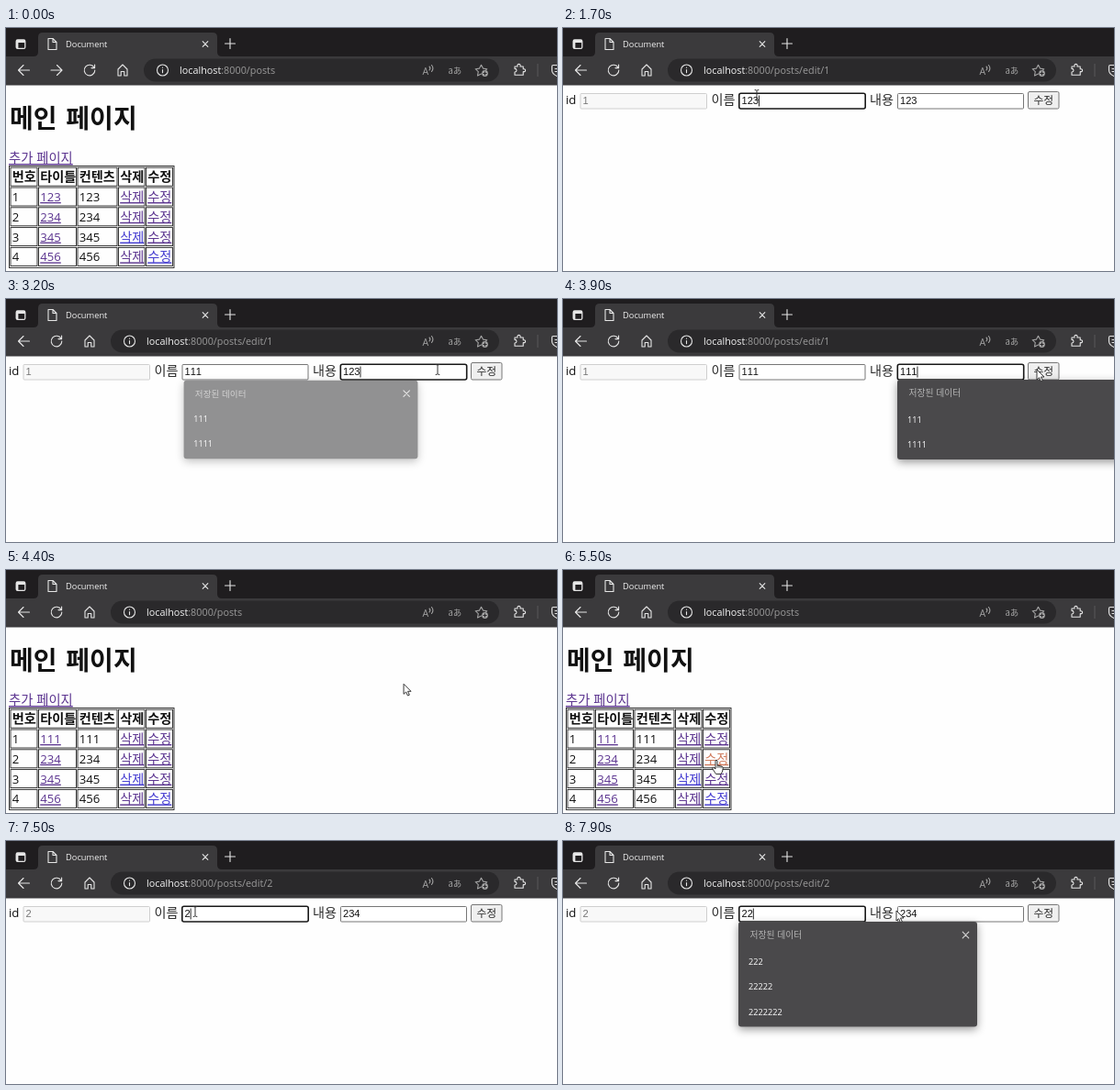
An HTML page that plays this animation: 600x265 px, repeating every 8 s.

```html
<!DOCTYPE html>
<html lang="ko">
<head>
<meta charset="utf-8">
<style>
html, body { margin: 0; width: 600px; height: 265px; overflow: hidden; background: #fefefe; }
svg { display: block; }
text { font-family: 'Open Sans', 'Noto Sans', sans-serif; white-space: pre; }
.ko { font-family: 'Noto Sans CJK KR', 'Noto Sans CJK', sans-serif; font-weight: 300; }
.bold { font-weight: 700; }
.title { word-spacing: 2px; }
.field { font-family: 'Liberation Sans', Arial, sans-serif; font-kerning: none; }
.link { text-decoration: underline; }
.icon path { fill: none; stroke: currentColor; stroke-width: 1.1; stroke-linecap: round; stroke-linejoin: round; }
.popup { filter: drop-shadow(0 3px 5px rgba(0, 0, 0, .4)); }
</style>
</head>
<body>
<svg id="stage" width="600" height="265" viewBox="0 0 600 265"></svg>
<script>
const LOOP = 8000, STEP = 100;
const VISITED = '#5c3590', UNVISITED = '#443bd0', ACTIVE = '#cf7a5c';
const stage = document.getElementById('stage');

const saved = ['111', '1111', '123', '1234', '222', '22222', '2222222', '234'];

const pages = [
  { from: 0, title: '123', forward: true },
  { from: 700, id: 1 },
  { from: 4200, title: '111' },
  { from: 5700, id: 2 }
];

// Typed text of the two editable fields: [time, text]
const typedName = [
  [0, '123'], [1800, '12'], [1900, '1'], [2000, ''], [2200, '1'], [2400, '11'], [2600, '111'],
  [5700, '234'], [7200, '23'], [7300, '2'], [7400, ''], [7500, '2'], [7700, '22']
];
const typedContent = [
  [0, '123'], [3300, '12'], [3400, '1'], [3500, ''], [3600, '1'], [3700, '11'], [3800, '111'], [5700, '234']
];

// Which field has the focus: [time, index]
const focus = [[0, -1], [1600, 0], [3140, 1], [4200, -1], [6600, 0]];

const popups = [
  { x: 191, on: 2150, off: 3140, typed: typedName },
  { x: 364, on: 3500, off: 4040, typed: typedContent },
  { x: 191, on: 7510, off: 9000, typed: typedName }
];

// Pointer path: [time, x, y]
const track = [
  [0, 185, 290], [200, 178, 255], [500, 165, 182], [1000, 165, 180], [1500, 211, 73], [2700, 211, 73],
  [3100, 470, 77], [3500, 470, 77], [3850, 516, 77], [4250, 516, 77], [4500, 388, 150], [5000, 174, 236],
  [5350, 167, 207], [5700, 167, 207], [6200, 206, 77], [7500, 206, 77], [7850, 363, 76], [8000, 363, 76]
];

// Pressed edit links: [from, to, row]
const clicks = [[500, 700, 1], [5450, 5700, 2]];

const latest = (list, t) => list.filter(e => e[0] <= t).pop()[1];
const text = (x, y, size, fill, str, cls = '') =>
  `<text x="${x}" y="${y}" font-size="${size}" fill="${fill}" class="${cls}">${str}</text>`;
const rect = (x, y, w, h, fill, stroke = 'none', r = 0, line = 1) =>
  `<rect x="${x}" y="${y}" width="${w}" height="${h}" rx="${r}" fill="${fill}" stroke="${stroke}" stroke-width="${line}"/>`;
const icon = (color, d, x = 0, y = 0) =>
  `<g class="icon" color="${color}" transform="translate(${x} ${y})"><path d="${d}"/></g>`;

function browser(page) {
  const dx = page.forward ? 36 : 0, light = '#e6e6e6', dim = '#a3a3a3';
  const path = '/posts' + (page.id ? '/edit/' + page.id : '');
  return rect(0, 0, 600, 32, '#1f1d1f')
    + rect(0, 31, 600, 31.5, '#3b3a3c')
    + '<path d="M30 31q5 0 5-5V10q0-5 5-5h185q5 0 5 5v16q0 5 5 5z" fill="#3b3a3c"/>'
    + rect(11.2, 13, 9.6, 9.4, 'none', light, 1.5, 1.3)
    + rect(11, 13, 10, 3, light, 'none', 1)
    + rect(11, 15, 2.4, 7, light)
    + icon(light, 'M46 11.5h5l4 4v8h-9zM51 11.5v4h4')
    + text(65, 21, 9.3, '#f0f0f0', 'Document')
    + icon(light, 'M-2.8-2.8L2.8 2.8M2.8-2.8L-2.8 2.8', 217, 17.5)
    + icon(light, 'M-5.5 0h11M0-5.5v11', 244, 17)
    + icon(light, 'M6 0H-6l5.5-5.5M-6 0l5.5 5.5', 19.5, 46)
    + (page.forward ? icon(light, 'M-6 0H6L.5-5.5M6 0L.5 5.5', 55, 46) : '')
    + icon(light, 'M5.2-2.5A5.8 5.8 0 1 0 5.8 0M5.6-6v3.6H2', 55 + dx, 46)
    + icon(light, 'M-5-1L0-6 5-1V6H1.8V1.5H-1.8V6H-5z', 91 + dx, 46)
    + rect(114 + dx, 33.5, 423 - dx, 25, '#2a292b', 'none', 12.5)
    + icon(light, 'M6 0A6 6 0 1 1-6 0A6 6 0 1 1 6 0M0-.5v3.3M0-3v.2', 134.5 + dx, 46)
    + text(153 + dx, 50, 10.8, '#f4f4f4', `localhost<tspan fill="#9b9b9b">:8000${path}</tspan>`)
    + text(453.5, 50.5, 10.5, dim, 'A')
    + icon(dim, 'M461 42q1.8 1.6 0 4M463.5 40.5q2.8 3.5 0 7')
    + text(481.5, 49.5, 9.5, dim, 'aあ', 'ko')
    + icon(dim, 'M516 50l-4 2 .8-4.3-3.1-3 4.3-.6 2-3.9 2 3.9 4.3.6-1.4 1.4', 1.5)
    + `<circle cx="521.5" cy="49.5" r="3.4" fill="${dim}"/>`
    + icon('#2a292b', 'M519.9 49.5h3.2M521.5 47.9v3.2')
    + icon(light, 'M554 42h3q-.5-2.6 1.5-2.6t1.5 2.6h3.2v2.8q2.4-.3 2.4 1.4t-2.4 1.4v3.6H554v-3.2q2 0 2-1.8t-2-1.8z')
    + rect(578.5, 39, 1, 14, '#5a595b')
    + icon(light, 'M601 40.5h-5q-1.5 0-1.5 1.5v4q0 4 5.5 6.5M598 44.5h3M598 47.5h3');
}

function listPage(page, t) {
  const left = [5, 35.5, 78, 122.5, 152.5], right = [34, 76.5, 121, 151, 181.5];
  const heads = ['번호', '타이틀', '컨텐츠', '삭제', '수정'];
  const values = [page.title, '234', '345', '456'];
  const pressed = clicks.find(c => t >= c[0] && t < c[1]);
  let out = text(4, 108.5, 28, '#111', '메인 페이지', 'ko bold title')
    + text(3, 147, 14.3, VISITED, '추가 페이지', 'ko link')
    + rect(3.5, 150.5, 179.5, 111, 'none', '#222', 0, .9);
  for (let row = 0; row < 5; row++) {
    const top = 152.2 + 21.8 * row, v = values[row - 1];
    const cells = row ? [row, v, v, '삭제', '수정'] : heads;
    cells.forEach((cell, col) => {
      const link = row && (col == 1 || col > 2), hangul = !row || col > 2;
      const active = pressed && pressed[2] == row && col == 4;
      const fresh = row > 2 && row == col;
      const color = active ? ACTIVE : !link ? '#111' : fresh ? UNVISITED : VISITED;
      out += rect(left[col], top, right[col] - left[col], 20, 'none', '#222', 0, .9)
        + text(left[col] + 1.7, top + 15, hangul ? 14.2 : 13.2, color, cell,
          (hangul ? 'ko ' : '') + (link ? 'link' : row ? '' : 'bold'));
    });
  }
  return out;
}

function input(x, value, focused, disabled) {
  const caret = x + 3 + value.length * 11.1 * .556;
  return (disabled ? rect(x + .5, 71.5, 137.5, 16.5, '#f8f8f8', '#cfcfcf', 1)
    : focused ? rect(x + .3, 71.2, 137.4, 16.8, '#fff', '#181818', 2, 1.6)
    : rect(x + .5, 71.5, 137, 16.5, '#fff', '#767676', 1))
    + text(x + 3, 83, 11.1, disabled ? '#777' : '#111', value, 'field')
    + (focused ? rect(caret, 73.5, .9, 12, '#111') : '');
}

function editPage(page, t) {
  const active = latest(focus, t);
  return text(3, 83, 13.2, '#111', 'id')
    + input(18.5, String(page.id), false, true)
    + text(161.5, 83, 14.1, '#2a2a2a', '이름', 'ko')
    + input(191.5, latest(typedName, t), active == 0)
    + text(334, 83, 14.1, '#2a2a2a', '내용', 'ko')
    + input(364, latest(typedContent, t), active == 1)
    + rect(506.5, 69.5, 33.5, 18.5, '#efefef', '#767676', 1.5)
    + text(512.5, 83, 11.8, '#2a2a2a', '수정', 'ko');
}

function popup({ x, on, off, typed }, t) {
  const alpha = Math.min(1, (t - on) / 90, 1 - (t - off) / 150);
  if (alpha <= 0) return '';
  const prefix = latest(typed, t), items = saved.filter(s => s.startsWith(prefix));
  const h = 32 + 27.5 * items.length, cx = x + 130, cy = 88 + h / 2;
  return `<g class="popup" opacity="${alpha}" transform="translate(${cx} ${cy}) scale(${.95 + .05 * alpha}) translate(${-cx} ${-cy})">`
    + rect(x, 88, 260, h, '#4a494b', 'none', 3)
    + text(x + 12.5, 106, 9.8, '#b4b4b4', '저장된 데이터', 'ko')
    + icon('#d8d8d8', 'M-3.3-3.3L3.3 3.3M3.3-3.3L-3.3 3.3', x + 247.5, 102.5)
    + items.map((s, i) => text(x + 11, 134.5 + 27.5 * i, 9.2, '#fff', s)).join('')
    + '</g>';
}

function pointer(page, t) {
  const i = track.findIndex(p => p[0] > t), a = track[i - 1], b = track[i];
  const u = (t - a[0]) / (b[0] - a[0]), k = u * u * (3 - 2 * u);
  const x = a[1] + (b[1] - a[1]) * k, y = a[2] + (b[2] - a[2]) * k;
  const overLink = !page.id && x > 124 && x < 181 && y > 175 && y < 258;
  const overField = page.id && y > 70 && y < 88 && (x > 191 && x < 329 || x > 364 && x < 502);
  const shape = overField
    ? '<path d="M-2.3-5.5Q0-5.5 0-4.5 0-5.5 2.3-5.5M0-4.5v9M-2.3 5.5Q0 5.5 0 4.5 0 5.5 2.3 5.5" fill="none" stroke="#333"/>'
    : overLink
    ? '<path d="M-1 1Q0-1 1 1V6l5 1.2q1.3.4 1.2 2L6.5 13 5 15.5H-.5L-4 10q-1-2 .8-1.8L-1 10z" fill="#fff" stroke="#222" stroke-width=".9"/><path d="M1 6v3M3 6.5V9M5 7v2.3" stroke="#222" stroke-width=".7"/>'
    : '<path d="M0 0V11l2.6-2.3 1.8 4 1.9-.8-1.8-3.9H8z" fill="#fff" stroke="#222" stroke-width=".9"/>';
  return `<g transform="translate(${x} ${y})">${shape}</g>`;
}

const start = performance.now();
let shown = -1;

function draw() {
  const t = Math.floor((performance.now() - start) % LOOP / STEP) * STEP;
  if (t != shown) {
    shown = t;
    const page = pages.filter(p => p.from <= t).pop();
    stage.innerHTML = browser(page)
      + (page.id ? editPage(page, t) + popups.map(p => popup(p, t)).join('') : listPage(page, t))
      + pointer(page, t);
  }
  requestAnimationFrame(draw);
}
draw();
</script>
</body>
</html>
```
